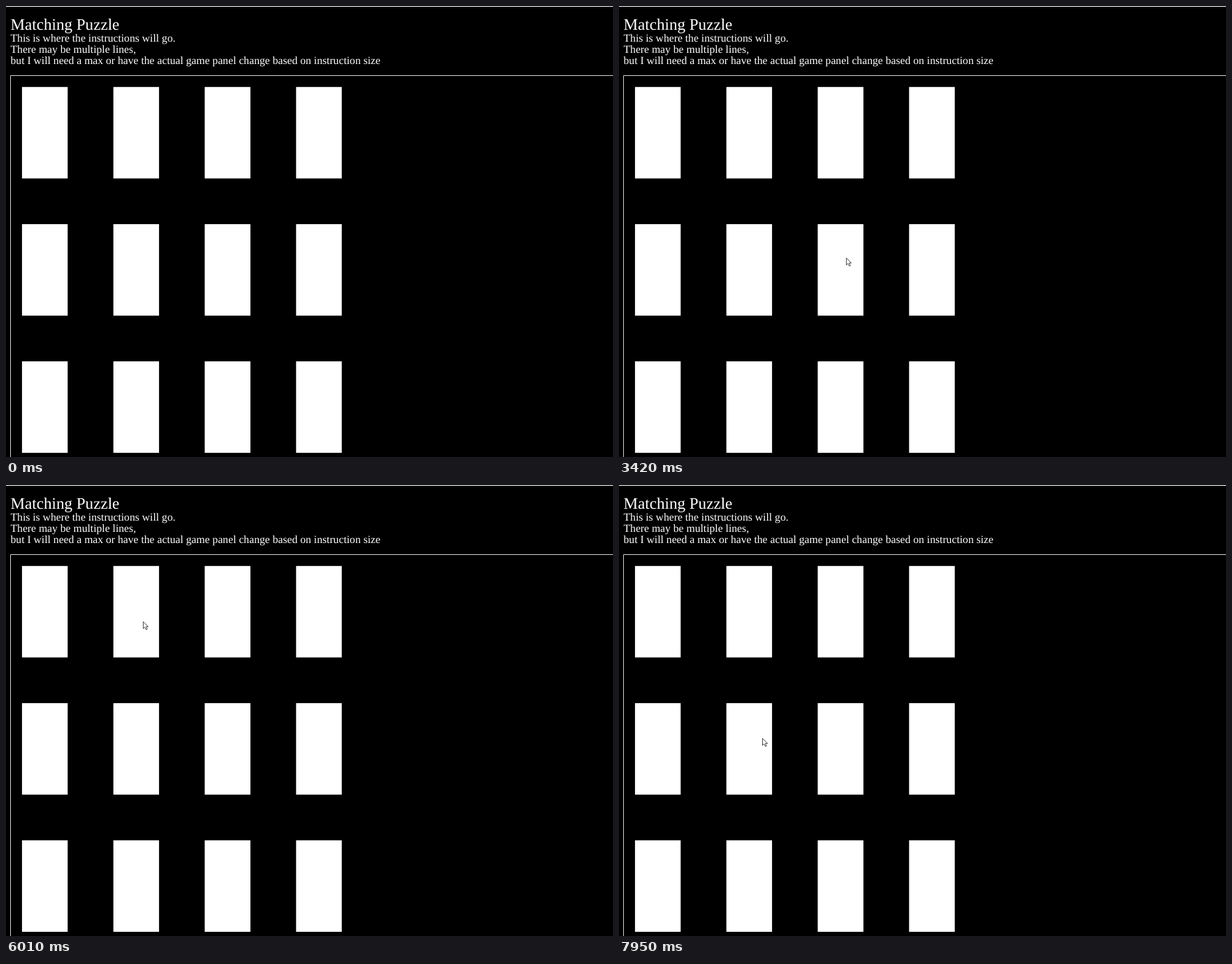
These frames come from a looping animation (869x645 px, 8 s). An HTML page:

```html
<!DOCTYPE html>
<html lang="en">
<head>
<meta charset="utf-8">
<title>Matching Puzzle</title>
<style>
  html, body { margin: 0; width: 100%; height: 100%; overflow: hidden; background: #000; }
  svg { display: block; width: 869px; height: 645px; }
  text { font: 15.67px "Liberation Serif", "Times New Roman", serif; fill: #fff; text-rendering: geometricPrecision; }
  .title { font-size: 23.1px; }

  .face, .spot, .trace, .pointer { opacity: 0; }
  .face rect { fill: #f00; }
  .face, .spot, .trace, .pointer { animation: 8s step-end -10ms infinite; }
  .five { animation-name: five; }
  .three { animation-name: three; }
  .one { animation-name: one; }
  .spot { animation-name: click; fill: #ffff70; }
  .trace { animation-name: trace; fill: #be0000; }
  .pointer { animation-name: move; }

  @keyframes five { 18.75% { opacity: 1 } 42.75% { opacity: 0 } }
  @keyframes three { 51.875% { opacity: 1 } 74.25% { opacity: 0 } }
  @keyframes one { 80.125% { opacity: 1 } 99.375% { opacity: 0 } }
  @keyframes trace { 28.625% { opacity: 1 } 29.5% { opacity: 0 } }
  @keyframes click {
    17.875%, 33.625%, 66% { opacity: 1 }
    18.75%, 35.25%, 66.875% { opacity: 0 }
  }
  @keyframes move {
    0% { opacity: 0; transform: translate(772px, 451px) }
    6.75% { opacity: 1; transform: translate(772px, 451px) }
    7.625% { opacity: 1; transform: translate(626px, 381px) }
    8.5% { opacity: 1; transform: translate(634px, 406px) }
    /* to the first card */
    11% { opacity: 1; transform: translate(612px, 404px) }
    11.875% { opacity: 1; transform: translate(560px, 398px) }
    12.75% { opacity: 1; transform: translate(500px, 391px) }
    13.625% { opacity: 1; transform: translate(462px, 386px) }
    14.5% { opacity: 1; transform: translate(448px, 385px) }
    15.375% { opacity: 1; transform: translate(451px, 384px) }
    /* to the second card */
    28.625% { opacity: 1; transform: translate(405px, 372px) }
    29.5% { opacity: 1; transform: translate(345px, 362px) }
    30.375% { opacity: 1; transform: translate(325px, 360px) }
    /* to the third card */
    57.625% { opacity: 1; transform: translate(290px, 310px) }
    58.5% { opacity: 1; transform: translate(235px, 245px) }
    59.375% { opacity: 1; transform: translate(205px, 210px) }
    60.25% { opacity: 1; transform: translate(199px, 203px) }
    74.25% { opacity: 1; transform: translate(198px, 199px) }
    75.125% { opacity: 1; transform: translate(196px, 195px) }
    /* down to the next row */
    86% { opacity: 1; transform: translate(194px, 215px) }
    86.875% { opacity: 1; transform: translate(193px, 255px) }
    88.125% { opacity: 1; transform: translate(196px, 300px) }
    89.375% { opacity: 1; transform: translate(200px, 335px) }
    91% { opacity: 1; transform: translate(204px, 356px) }
    91.875%, 100% { opacity: 1; transform: translate(205px, 362px) }
  }
</style>
</head>
<body>
<svg viewBox="0 0 869 645">
  <defs>
    <rect id="card" width="65.4" height="130.8"/>
    <g id="row">
      <use href="#card"/>
      <use href="#card" x="130.8"/>
      <use href="#card" x="261.6"/>
      <use href="#card" x="392.4"/>
    </g>
    <path id="arrow" d="M.5 .5V10.4L2.8 8.2L4.5 11.9L6.2 11.2L4.6 7.6H7.7Z"/>
  </defs>

  <rect width="869" height="645"/>
  <rect width="869" height="1" fill="#fff"/>
  <text class="title" x="6.5" y="34.3">Matching Puzzle</text>
  <text x="6.5" y="50.7">This is where the instructions will go.</text>
  <text x="6.5" y="67">There may be multiple lines,</text>
  <text x="6.5" y="83.3">but I will need a max or have the actual game panel change based on instruction size</text>
  <path d="M869 99.5H6.5V645" fill="none" stroke="#d0d0d0"/>

  <g fill="#fff" transform="translate(22.9 115.8)">
    <use href="#row"/>
    <use href="#row" y="196.2"/>
    <use href="#row" y="392.4"/>
  </g>

  <g transform="translate(415.3 312)"><g class="face five">
    <rect width="65.4" height="130.8"/><text y="32.8">Card 5</text>
  </g></g>
  <g transform="translate(284.5 312)"><g class="face three">
    <rect width="65.4" height="130.8"/><text y="32.8">Card 3</text>
  </g></g>
  <g transform="translate(153.7 115.8)"><g class="face one">
    <rect width="65.4" height="130.8"/><text y="32.8">Card 1</text>
  </g></g>

  <use class="trace" href="#arrow" x="451" y="384"/>
  <g class="pointer">
    <circle class="spot" r="8"/>
    <use href="#arrow" fill="#fff" stroke="#222" stroke-width=".8"/>
  </g>
</svg>
</body>
</html>
```
